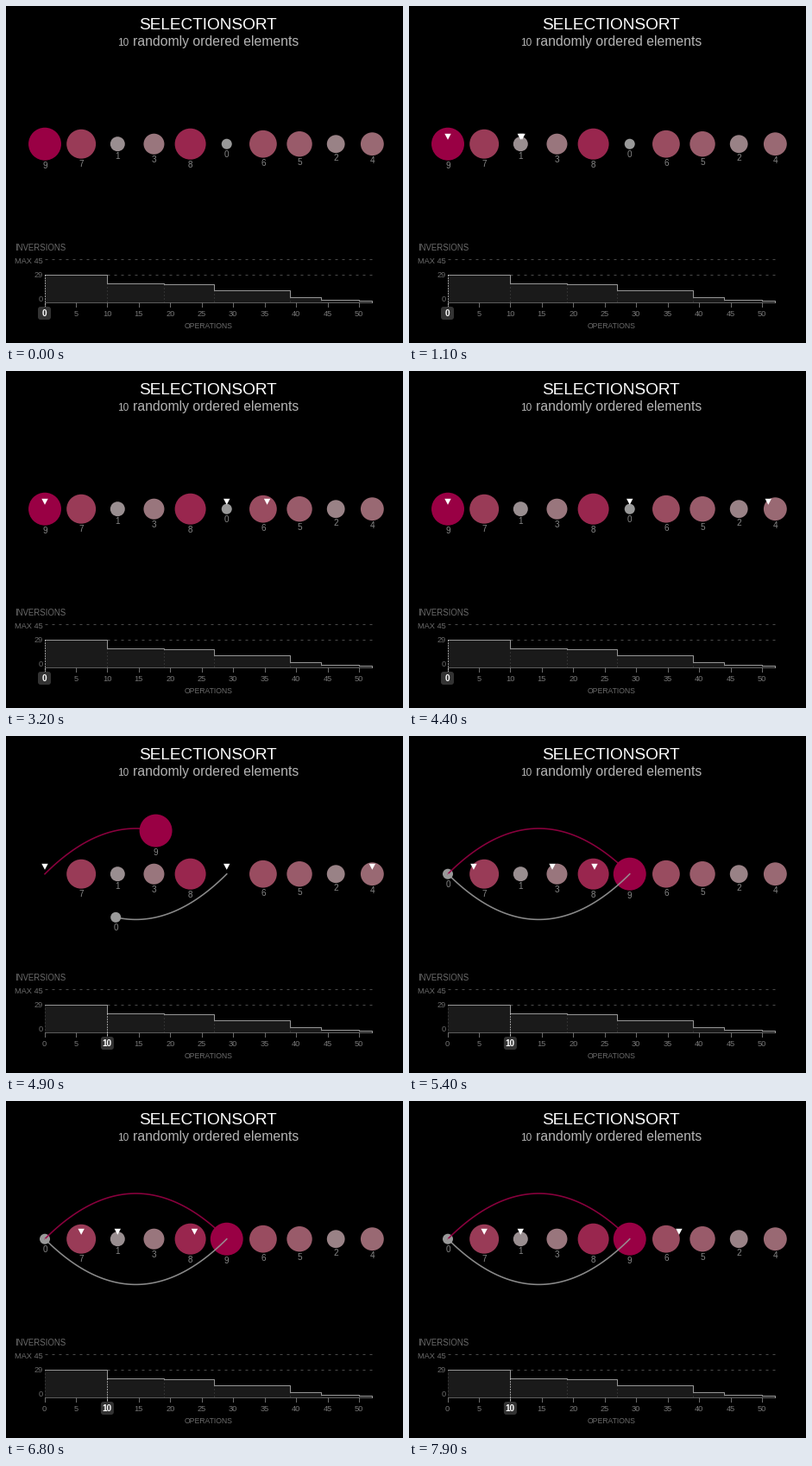
Recreate the animation shown at these times as a matplotlib script. Size 460x390 px, loop 8 s.

```python
import numpy as np
import matplotlib.pyplot as plt
from matplotlib.animation import FuncAnimation
from matplotlib.patches import Circle, FancyBboxPatch, Polygon

W, H, DPI = 460, 390, 80
FRAMES, STEP_MS = 80, 100
OP_MS, PHASE = 514, 0.077       # duration of one operation, start offset
VALUES = [9, 7, 1, 3, 8, 0, 6, 5, 2, 4]
N = len(VALUES)
BALL_X, BALL_GAP, BALL_Y = 45, 42.15, 159.7
AXIS_X, AXIS_Y, OP_W, INV_H = 44.5, 342.5, 7.29, 1.1
PX = 72 / DPI


def inversions(a):
    return sum(a[i] > a[j] for i in range(N) for j in range(i + 1, N))


def selection_sort(values):
    """Return one (order before, markers, swapped pair) entry per operation."""
    a, ops = list(values), []
    for i in range(N - 1):
        low = i
        for j in range(i + 1, N):
            if a[j] < a[low]:
                low = j
            ops.append((list(a), (i, low, j), None))
        if low != i:
            ops.append((list(a), (i, low, N - 1), (i, low)))
            a[i], a[low] = a[low], a[i]
    return ops, a


OPS, SORTED = selection_sort(VALUES)
SWAP_OPS = [k + 1 for k, op in enumerate(OPS) if op[2]]


def ball_x(slot):
    return BALL_X + BALL_GAP * slot


def radius(v):
    return 6 * np.sqrt(1 + v)


def color(v):
    t = v / 9
    return (0.6, 0.6 * (1 - t) ** 0.634, 0.6 - t * 0.333)


def ease(t):
    return 4 * t ** 3 if t < 0.5 else 1 - 4 * (1 - t) ** 3


def arc(start, end, s, side):
    """Point(s) on the quadratic curve between two slots."""
    x0, x1 = ball_x(start), ball_x(end)
    return x0 + (x1 - x0) * s, BALL_Y + side * abs(x1 - x0) * s * (1 - s)


def op_x(op):
    return AXIS_X + OP_W * op


def inv_y(n):
    return AXIS_Y - INV_H * n


fig = plt.figure(figsize=(W / DPI, H / DPI), dpi=DPI, facecolor="black")
ax = fig.add_axes([0, 0, 1, 1])
ax.set_xlim(0, W)
ax.set_ylim(H, 0)
ax.axis("off")


def text(x, y, s, size, col, ha="center", **kw):
    return ax.text(x, y, s, fontsize=size * PX, color=col, ha=ha,
                   va="baseline", family="Liberation Sans", **kw)


def line(xs, ys, col, width=1, **kw):
    return ax.plot(xs, ys, color=col, lw=width * PX, **kw)[0]


# headings
text(234, 27, "SELECTIONSORT", 18.95, "white")
text(129, 46, "10", 11.8, "#b4b4b4", "left")
text(339.5, 46, "randomly ordered elements", 15.7, "#b4b4b4", "right")

# chart
text(10, 283, "INVERSIONS", 9.6, "#6c6c6c", "left")
text(43, 297.5, "MAX 45", 9.3, "#6c6c6c", "right")
text(43, 314.5, "29", 9.3, "#6c6c6c", "right")
text(43, 342.5, "0", 9.3, "#6c6c6c", "right")
text(235, 373, "OPERATIONS", 8.6, "#6c6c6c")

levels = [inversions(op[0]) for op in OPS] + [inversions(SORTED)]
op_xs = [op_x(k) for k in range(len(levels))]
level_ys = [inv_y(n) for n in levels]
ax.fill_between(op_xs, level_ys, AXIS_Y, step="post", color="#1a1a1a", lw=0)
for n in (45, levels[0]):
    line([AXIS_X, op_xs[-1]], [inv_y(n)] * 2, "#4a4a4a", dashes=(3, 5))
for k in [0] + SWAP_OPS:
    line([op_x(k)] * 2, [level_ys[k], AXIS_Y], "#484848", dashes=(1, 3))
line([AXIS_X, op_xs[-1]], [AXIS_Y] * 2, "#5c5c5c")
line(op_xs, level_ys, "#969696", drawstyle="steps-post")

ticks = {}
for k in range(0, 51, 5):
    line([op_x(k)] * 2, [AXIS_Y, AXIS_Y + 5], "#6c6c6c")
    ticks[k] = text(op_x(k), 359.3, str(k), 9.3, "#757575")

now_line = line([], [], "white", dashes=(1, 2), zorder=3)
now_box = FancyBboxPatch((0, 350), 11, 11, fc="#333333", ec="none", zorder=4,
                         boxstyle="round,pad=2,rounding_size=3")
ax.add_patch(now_box)
now_text = text(0, 359.3, "0", 10, "white", weight="bold", zorder=5)

# balls, swap trails and markers
balls, labels = {}, {}
for v in VALUES:
    balls[v] = Circle((0, 0), radius(v), fc=color(v), ec="none", zorder=6 + v / 20)
    ax.add_patch(balls[v])
    labels[v] = text(0, 0, str(v), 10, "#858585", zorder=7)
trails = [line([], [], "white", 1.6, zorder=8, alpha=0.9) for _ in range(2)]
markers = [Polygon([(0, 0)] * 3, fc="white", ec="none", zorder=9) for _ in range(3)]
for m in markers:
    ax.add_patch(m)


def place_ball(v, x, y):
    balls[v].center = (x, y)
    labels[v].set_position((x, y + radius(v) + 9.3))


def draw(frame):
    u = PHASE + frame * STEP_MS / OP_MS
    k = int(u)
    s = u - k
    order, target, pair = OPS[k]

    for slot, v in enumerate(order):
        place_ball(v, ball_x(slot), BALL_Y)
    if pair:
        a, b = pair
        place_ball(order[a], *arc(a, b, s, -1))
        place_ball(order[b], *arc(b, a, s, 1))

    # the latest swap leaves its trails behind
    done = [n for n in SWAP_OPS if n <= k + 1]
    current = done[-1] if done else 0
    for trail in trails:
        trail.set_data([], [])
    if current:
        before, _, (a, b) = OPS[current - 1]
        path = np.linspace(0, s if pair else 1, 60)
        for trail, p, q, side in zip(trails, (a, b), (b, a), (-1, 1)):
            trail.set_data(*arc(p, q, path, side))
            trail.set_color(color(before[p]))

    source = OPS[k - 1][1] if k else (-1, -1, -1)
    for m, p, q in zip(markers, source, target):
        x = ball_x(p + (q - p) * ease(s))
        m.set_xy([(x - 3.7, 147.8), (x + 3.7, 147.8), (x, 154.8)])
        m.set_visible(frame > 1)

    x = op_x(current)
    now_line.set_data([x, x], [level_ys[current], 348])
    now_box.set_x(x - 5.5)
    now_text.set_text(str(current))
    now_text.set_x(x)
    for n, label in ticks.items():
        label.set_visible(n != current)


anim = FuncAnimation(fig, draw, frames=FRAMES, interval=STEP_MS,
                     init_func=lambda: draw(0), repeat=True, repeat_delay=0)
plt.show()
```
